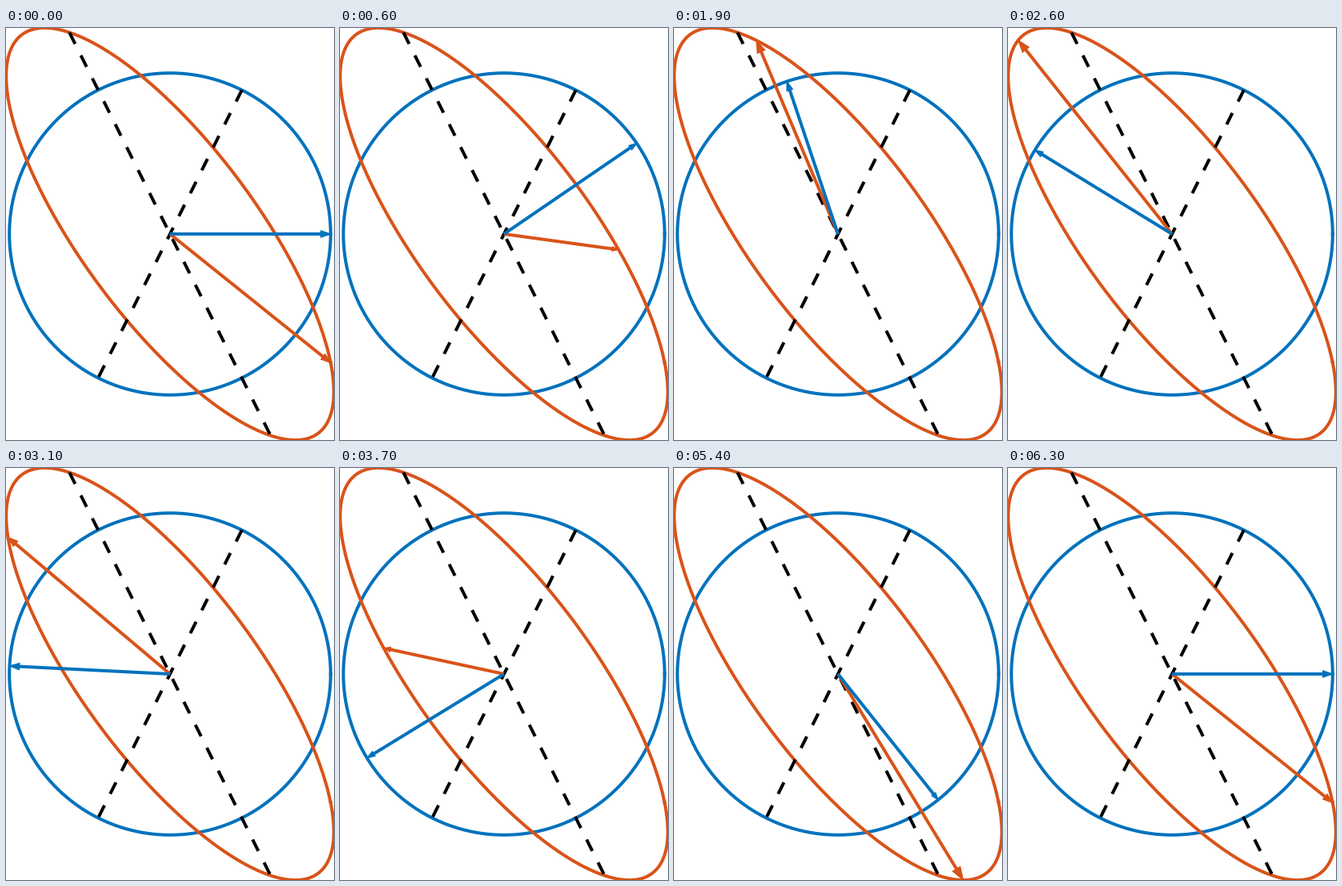
A matplotlib script that plays this animation: 410 by 514 pixels, repeating every 6.4 s.

```python
import numpy as np
import matplotlib.pyplot as plt
from matplotlib.animation import FuncAnimation
from matplotlib.patches import Polygon

W, H, DPI = 410, 514, 64
FRAMES, INTERVAL = 64, 100
CENTER = np.array([205.0, 257.0])
RADIUS = 200.8
STROKE = 4 * 72 / DPI  # four pixels, in points
BLUE, ORANGE = "#0072BD", "#D95319"
MATRIX = np.array([[1.0, -0.2], [-0.8, 1.0]])
HEAD = 0.074  # head length relative to the longer component
OVERSHOOT = 2.0

fig = plt.figure(figsize=(W / DPI, H / DPI), dpi=DPI, facecolor="white")
ax = fig.add_axes([0, 0, 1, 1])
ax.set_xlim(0, W)
ax.set_ylim(H, 0)
ax.axis("off")


def to_stage(points):
    """Map unit coordinates (y up), one point per column, to pixels."""
    x, y = points
    return CENTER[0] + RADIUS * x, CENTER[1] - RADIUS * y


def unit(angle):
    return np.array([np.cos(angle), np.sin(angle)])


def stroke(points, color, **kw):
    return ax.plot(*to_stage(points), color=color, lw=STROKE, **kw)[0]


class Arrow:
    def __init__(self, color, z):
        self.shaft, = ax.plot([], [], color=color, lw=STROKE, zorder=z,
                              solid_capstyle="butt")
        self.head = Polygon(np.zeros((3, 2)), fc=color, ec="none", zorder=z)
        ax.add_patch(self.head)

    def point(self, vec):
        v = RADIUS * vec * [1, -1]
        along = v / np.hypot(*v)
        side = np.array([-along[1], along[0]])
        size = HEAD * np.abs(v).max()
        tip = CENTER + v + OVERSHOOT * along
        base = tip - size * along
        self.head.set_xy([tip, base + size * side / 3, base - size * side / 3])
        self.shaft.set_data(*zip(CENTER, base + along))


circle = unit(np.linspace(0, 2 * np.pi, 361))
stroke(circle, BLUE, zorder=1)
stroke(MATRIX @ circle, ORANGE, zorder=2)

# Eigenvector axes, dashed from the top end
for direction, length in (((-1, 2), 1.4), ((1, 2), 1.0)):
    end = length * np.array(direction) / np.sqrt(5)
    stroke(np.column_stack([end, -end]), "black", zorder=3,
           linestyle=(0, (4, 4)), dash_capstyle="butt")

image = Arrow(ORANGE, 4)
source = Arrow(BLUE, 5)


def update(i):
    vec = unit(2 * np.pi * i / (FRAMES - 1))
    source.point(vec)
    image.point(MATRIX @ vec)
    return source.shaft, source.head, image.shaft, image.head


anim = FuncAnimation(fig, update, frames=FRAMES, interval=INTERVAL,
                     repeat=True, repeat_delay=0, blit=False)
plt.show()
```
